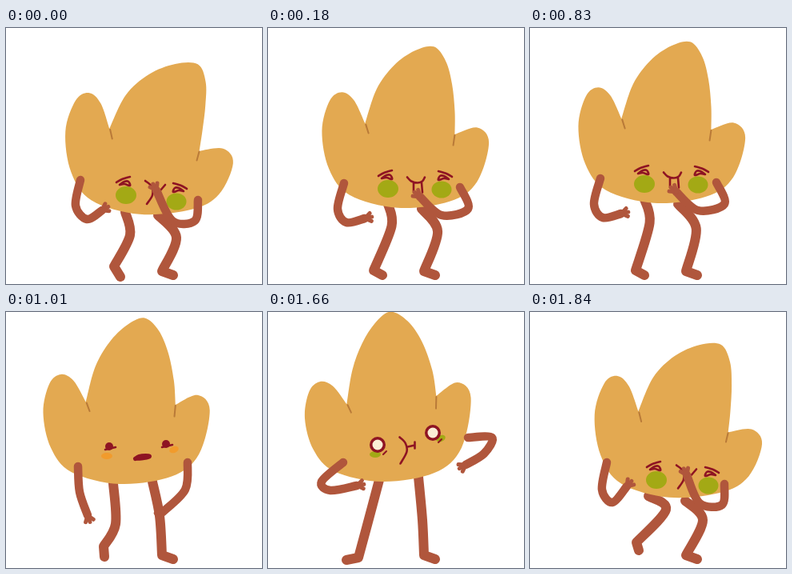
Write an HTML page with a canvas that moves like this. It is 320 by 320 pixels and loops after 2020 ms.

```html
<!DOCTYPE html>
<html lang="en">
<head>
<meta charset="utf-8">
<title>Queasy leaf</title>
<style>
html, body { margin: 0; width: 100%; height: 100%; overflow: hidden; background: #fff; }
canvas { display: block; }
</style>
</head>
<body>
<canvas id="stage" width="320" height="320"></canvas>
<script>
const ctx = document.getElementById('stage').getContext('2d');
const SKIN = '#e3a951', LIMB = '#b0563c', INK = '#8e1423', CREASE = '#b97a38';
const GREEN = '#a3a915', ORANGE = '#f19b2c', CREAM = '#fbeed6';
ctx.lineCap = ctx.lineJoin = 'round';

// Key points are "x y x y ..."; "|" separates strokes.
// The leaf at rest; every pose warps this one shape.
const SIDES = '92 113 76 88 60 81 46 93 39 128 49 170 75 199 135 213 200 203 234 174 247 116 231 97 204 111';
const PEAK = '204 111 201 80 192 45 178 18 159 4 138 15 118 38 102 70 92 113';
const CREASES = '93 114 97 124|204 112 203 126';
const RIGHT_FOOT = ' 195 304 209 309';

// Mouths are placed around the midpoint between the eyes.
const GAG = '-8 -6 0 1 1 12 -6 23|17 -1 11 6';
const PURSED = '-10 1 -5 6 3 8 9 6 12 1|-2 8 -2 20|8 8 9 20';
const GROAN = '-3 17 2 14 10 13 15 14 8 16 -3 17';
const FLAT = '-8 19 5 17 19 13';
const BITE = '-7 -2 0 5 2 16 -6 31|3 10 12 8|12 4 12 12';

// warp: shift x, shift y, lean of the peak, squash, sideways fold.
// Limbs: shoulder to hand; hip, knee, ankle, toe.
const bent = {
  warp: [32, 20, 48, 13, 50], eyes: [[148, 193], [216, 201]], look: squint, mouth: GAG,
  arms: ['93 190 87 222 101 239 120 228', '240 215 236 241 208 241 188 203'],
  legs: ['149 230 155 259 135 298 143 311', '190 234 213 262' + RIGHT_FOOT]
};
const holding = {
  warp: [22, 8, 21, 3, 26], eyes: [[143, 181], [215, 182]], look: squint, mouth: PURSED,
  arms: ['90 190 82 222 93 239 116 234', '235 195 245 222 212 230 185 207'],
  legs: ['145 216 151 245 132 303 143 309', '187 222 209 252' + RIGHT_FOOT]
};
const weary = {
  warp: [7, 2, 7, 0, 9], eyes: [[129, 168], [200, 165]], look: droop, mouth: GROAN,
  arms: ['90 193 92 225 102 254', '227 188 224 222 196 250'],
  legs: ['134 214 137 265 122 293 123 306', '183 212 192 255' + RIGHT_FOOT]
};
const calm = {
  warp: [0, 0, 0, 0, 0], eyes: [[125, 168], [196, 160]], look: dot, mouth: FLAT,
  arms: ['91 192 88 225 87 260', '214 197 217 230 217 256'],
  legs: ['129 211 117 262 113 307 98 310', '179 209 190 250' + RIGHT_FOOT]
};
const shocked = {
  warp: [8, -1, -14, -1, -14], eyes: [[137, 166], [206, 151]], look: stare, mouth: BITE,
  arms: ['94 188 67 212 78 223 111 217', '250 157 280 157 270 177 247 191'],
  legs: ['139 210 123 270 113 307 98 310', '188 206 193 260' + RIGHT_FOOT]
};
const doubled = {
  warp: [39, 19, 40, 10, 47], eyes: [[156, 194], [226, 201]], look: squint, mouth: GAG,
  arms: ['96 188 90 222 103 238 121 218', '243 215 240 241 212 239 196 204'],
  legs: ['148 230 170 247 133 288 136 298', '194 236 216 260' + RIGHT_FOOT]
};

// Each entry: end time in ms, pose, offset of everything above the feet
const timeline = [
  [180, bent, 0, 0], [650, holding, 5, 4], [830, holding, 0, 0], [1010, holding, -2, -2],
  [1190, weary, 0, 0], [1660, calm, 0, 0], [1840, shocked, 0, 0], [2020, doubled, 0, 0]
];

const same = p => p;
const parse = text => {
  const n = text.split(' ').map(Number);
  return n.flatMap((x, i) => i % 2 ? [] : [[x, n[i + 1]]]);
};

const warper = ([dx, dy, lean, squash, fold]) => ([x, y]) => {
  const u = (x - 143) / 104, v = (213 - y) / 208;
  return [x + dx + lean * v ** 3, y + dy + squash * v + fold * u * (v + 0.07)];
};

// Smooth curve through all points
function trace(pts, join) {
  const at = i => pts[Math.max(0, Math.min(pts.length - 1, i))];
  if (!join) ctx.moveTo(...pts[0]);
  for (let i = 0; i < pts.length - 1; i++) {
    const [a, b, c, d] = [at(i - 1), at(i), at(i + 1), at(i + 2)];
    ctx.bezierCurveTo(b[0] + (c[0] - a[0]) / 6, b[1] + (c[1] - a[1]) / 6,
      c[0] - (d[0] - b[0]) / 6, c[1] - (d[1] - b[1]) / 6, ...c);
  }
}

function line(color, width, ...curves) {
  ctx.strokeStyle = color;
  ctx.lineWidth = width;
  ctx.beginPath();
  curves.forEach(c => trace(c));
  ctx.stroke();
}

const strokes = (text, color, width, map = same) =>
  line(color, width, ...text.split('|').map(s => parse(s).map(map)));

function fill(color, curves, map = same) {
  ctx.fillStyle = color;
  ctx.beginPath();
  curves.forEach((c, i) => trace(parse(c).map(map), i > 0));
  ctx.fill();
}

function oval(color, x, y, rx, ry = rx, angle = 0) {
  ctx.fillStyle = color;
  ctx.beginPath();
  ctx.ellipse(x, y, rx, ry, angle, 0, 7);
  ctx.fill();
}

function placed(x, y, flip, paint) {
  ctx.save();
  ctx.translate(x, y);
  ctx.scale(flip, 1);
  paint();
  ctx.restore();
}

// Eye styles, drawn around the origin
function dot() { oval(INK, 0, 0, 5.6); }
function droop() {
  oval(INK, 0, 0, 5);
  strokes('-5 4 8 1', INK, 2.6);
}
function stare() {
  oval(INK, 0, 0, 10);
  oval(CREAM, 0, 0, 6.5);
  strokes('7 12 11 8', INK, 2);
}
function squint() {
  strokes('-10 0 -3 -4 7 -7', INK, 2.6);
  strokes('-6 3 0 -1 5 -1 7 4 0 2 -6 3', INK, 2.6);
}

function drawFace({ eyes, look, mouth }) {
  const sick = look === squint;
  const [[lx, ly], [rx, ry]] = eyes;
  const blush = sick || look === stare ? GREEN : ORANGE;
  if (sick) {
    oval(blush, lx + 2, ly + 16, 13, 11);
    oval(blush, rx - 3, ry + 16, 12.5, 10.5);
  } else {
    oval(blush, lx - 3, ly + 12, 7, 4);
    oval(blush, rx + 10, ry + 7, 6, 4, -0.4);
  }
  placed(lx, ly, 1, look);
  placed(rx, ry, sick ? -1 : 1, look);
  placed((lx + rx) / 2, (ly + ry) / 2, 1, () => {
    if (mouth === GROAN) fill(INK, [mouth]);
    strokes(mouth, INK, mouth === GROAN ? 5 : 2.6);
  });
}

// An arm ends in three fingers fanned around its direction
function drawArm(text) {
  const pts = parse(text);
  const [[ex, ey], [x, y]] = pts.slice(-2);
  const angle = Math.atan2(y - ey, x - ex);
  line(LIMB, 10.5, pts);
  for (const turn of [-0.6, 0, 0.6]) {
    const a = angle + turn;
    line(LIMB, 5, [[x, y], [x + 9 * Math.cos(a), y + 9 * Math.sin(a)]]);
  }
}

function draw(pose, dx, dy) {
  ctx.fillStyle = '#fff';
  ctx.fillRect(0, 0, 320, 320);

  // Hips follow the body while the feet stay planted
  for (const leg of pose.legs) {
    const pts = parse(leg).map(([x, y]) => {
      const k = Math.max(0, Math.min(1, (304 - y) / 84));
      return [x + dx * k, y + dy * k];
    });
    line(LIMB, 12, pts.slice(0, 3), pts.slice(2));
  }

  placed(dx, dy, 1, () => {
    const warp = warper(pose.warp);
    fill(SKIN, [SIDES, PEAK], warp);
    strokes(CREASES, CREASE, 2, warp);
    drawFace(pose);
    pose.arms.forEach(drawArm);
  });
}

function frame() {
  const t = performance.now() % 2020;
  const [, pose, dx, dy] = timeline.find(([end]) => t < end);
  draw(pose, dx, dy);
  requestAnimationFrame(frame);
}
frame();
</script>
</body>
</html>
```
